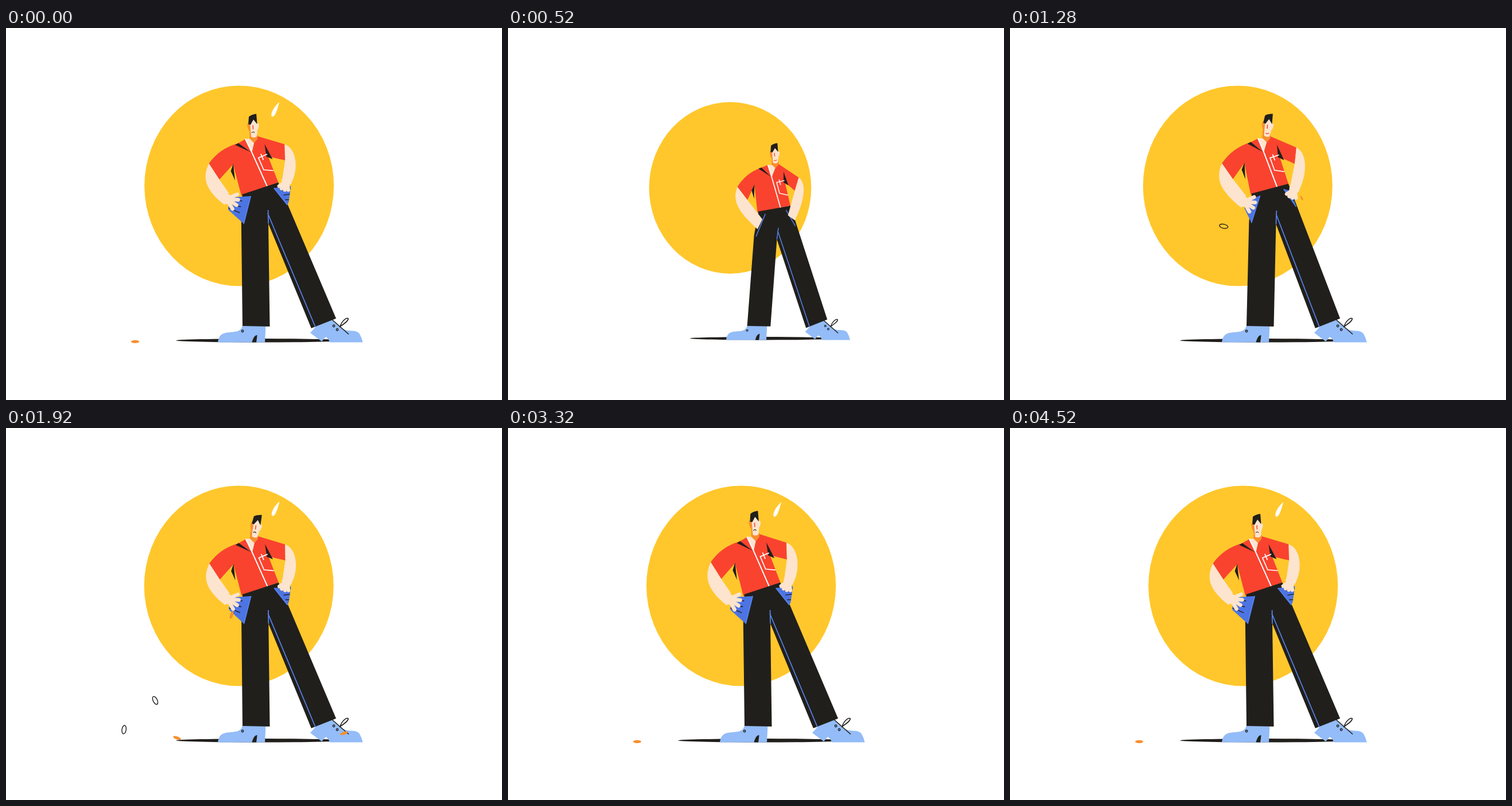
Recreate the animation shown at these times as an HTML page with a canvas. Size 864 by 648 pixels, loop 4560 ms.

```html
<!DOCTYPE html>
<html lang="en">
<head>
<meta charset="utf-8">
<title>Empty pockets</title>
<style>
html, body { margin: 0; width: 100%; height: 100%; overflow: hidden; background: #fff; }
canvas { display: block; width: 864px; height: 648px; }
</style>
</head>
<body>
<canvas id="stage"></canvas>
<script>
const LOOP = 4560, GROUND = 546.3, GRAVITY = 2400;
const canvas = document.getElementById('stage');
const ratio = window.devicePixelRatio || 1;
canvas.width = 864 * ratio;
canvas.height = 648 * ratio;
const ctx = canvas.getContext('2d');

const INK = '#211f1c', RED = '#f9432f', SKIN = '#fde4cf', SUN = '#ffc72c';
const ORANGE = '#f78f2d', SKY = '#93bcf8', BLUE = '#4d74e3', SEAM = '#5585ee';

const clamp = v => Math.min(1, Math.max(0, v));
const smooth = (t, a, b) => { const k = clamp((t - a) / (b - a)); return k * k * (3 - 2 * k); };
const rad = deg => deg * Math.PI / 180;
const add = (p, q, k = 1) => [p[0] + q[0] * k, p[1] + q[1] * k];
const lerp = (p, q, k) => [p[0] + (q[0] - p[0]) * k, p[1] + (q[1] - p[1]) * k];

function turn([x, y], [ox, oy], deg) {
  const c = Math.cos(rad(deg)), s = Math.sin(rad(deg));
  return [ox + (x - ox) * c - (y - oy) * s, oy + (x - ox) * s + (y - oy) * c];
}

function fill(color, d) {
  ctx.fillStyle = color;
  ctx.fill(new Path2D(d));
}
function line(color, width, d) {
  ctx.strokeStyle = color;
  ctx.lineWidth = width;
  ctx.stroke(new Path2D(d));
}
function oval(x, y, rx, ry, angle = 0) {
  ctx.beginPath();
  ctx.ellipse(x, y, rx, ry, angle, 0, 2 * Math.PI);
}
function dot(color, x, y, rx, ry = rx, angle = 0) {
  oval(x, y, rx, ry, angle);
  ctx.fillStyle = color;
  ctx.fill();
}
function ring(x, y, rx, ry = rx, angle = 0) {
  oval(x, y, rx, ry, angle);
  ctx.strokeStyle = INK;
  ctx.lineWidth = 1.4;
  ctx.stroke();
}

// The upper body is drawn upright, then tipped around the hips.
const HIP = [467.5, 280.3];
let lean = 0;   // 0: hands in pockets, 1: pockets turned out
let tip = 0;    // degrees
let shift = [0, 0];

const onHip = (x, y) => add(turn([x, y], HIP, tip), shift);

function inBody(stretch, paint) {
  ctx.save();
  ctx.translate(...add(HIP, shift));
  ctx.rotate(rad(tip));
  ctx.scale(1, stretch);
  ctx.translate(-HIP[0], -HIP[1]);
  paint();
  ctx.restore();
}

const arms = [
  {
    shoulder: [440, 200], swing: 13, outer: [392, 236], inner: [412.5, 262.5],
    elbow: [[383, 260], [387, 281]], wrist: [438, 312], pull: [-31, -22], half: [-5, 10],
    fan: 60, fanStep: -28, finger: 20,
    seam: [[449, 291], [430, 337]], cloth: [[411, 288], [407, 309]]
  },
  {
    shoulder: [478, 192], swing: -9.6, outer: [517, 217], inner: [509, 244],
    elbow: [[534.5, 230], [527.5, 266]], wrist: [502, 299], pull: [13, -25], half: [7, 5],
    fan: 80, fanStep: 22, finger: 16,
    seam: [[491, 283], [510, 315.5]], cloth: [[521, 284], [513, 311]]
  }
];
const swung = (arm, p) => turn(p, arm.shoulder, arm.swing * lean);

function drawShoes() {
  dot(INK, 444, 544.3, 148, 3.2);
  fill(SKY, 'M412 518H452.5L451 547.5H369C371 538 373 532 386 530.5C400 529 409 530 412 518Z');
  fill(INK, 'M428.5 547.5C430 541 433 535 437.5 535Q437 541 436 547.5Z');
  fill(SKY, 'M530 531L541 519L568 508L582 521Q590 528 604 527.5Q613 528 616 533Q620 540 621.5 547.5H564Q562 541 557 538L550 546Z');
  ring(412, 528, 1.7);
  ring(571, 519, 1.7);
  ring(577, 525.5, 1.7);
  line(INK, 1.6, 'M568 508L597 533.5M582 520C585 510 593 504 596 506C597 510 589 515 582 520Z');
}

function drawPants() {
  const crotch = onHip(472.5, 343);
  fill(INK, `M${onHip(435, 286)}L${onHip(500, 274.5)}L575 506L531.8 523L${crotch}L459.5 520L412 519L${onHip(426, 335)}Z`);
  line(SEAM, 1.7, `M${crotch}L${onHip(475.5, 319.5)}M${onHip(474, 325)}L539 521`);
}

function drawShirt() {
  const [l, r] = arms;
  const left = p => swung(l, p), right = p => swung(r, p);
  fill(RED, `M455 191L440 197Q${left([409, 208])} ${left(l.outer)}L${left(l.inner)}L426.7 232L433 288
    L500 274.5L489 227L${right(r.inner)}L${right(r.outer)}L476 189.5L471 191L462 216Z`);
  fill(SKIN, 'M455 191L462 216L471 193Z');
  fill(INK, 'M435 199L441 196.5L460 215Z M427 231L421 243L426 260Z M486 205V227L496 233Z');
  line('#fff', 2, 'M454 191L462 216L480 279');
  line('#fff', 1.7, 'M488 223L472 227L478 249L495 253M477 221L480 232');
}

// Cloth unfolds from the pocket seam, with three pleats.
function drawPocket({ seam: [a, b], cloth }) {
  const [c, d] = cloth.map(p => lerp(lerp(a, b, .5), p, lean));
  fill(BLUE, `M${a}L${b}L${d}L${c}Z`);
  for (let k = .15; k < 1; k += .35) {
    const from = lerp(c, d, k);
    line(INK, 1.4, `M${from}L${lerp(from, lerp(a, b, .1 + .7 * k), .65)}`);
  }
  line(SEAM, 1.7, `M${a}L${b}`);
}

function drawArm(arm) {
  const wrist = add(arm.wrist, arm.pull, lean);
  const [c, d] = arm.elbow.map(p => swung(arm, p));
  fill(SKIN, `M${swung(arm, arm.outer)}C${c} ${d} ${add(wrist, arm.half)}L${add(wrist, arm.half, -1)}L${swung(arm, arm.inner)}Z`);

  const size = clamp(lean / .45);
  if (size < .05) return;
  dot(SKIN, ...wrist, 9 * size);
  ctx.lineCap = 'round';
  for (let i = 0; i < 4; i++) {
    const end = turn(add(wrist, [arm.finger * size, 0]), wrist, arm.fan + arm.fanStep * i - tip);
    line(SKIN, 6.5 * size, `M${wrist}L${end}`);
  }
  ctx.lineCap = 'butt';
}

function drawHead(t) {
  const tilt = 14 * smooth(t, 1060, 1420) * (1 - smooth(t, 1800, 2500));
  ctx.save();
  ctx.translate(468.5, 188 + 2.5 * lean);
  ctx.rotate(rad(-tip));
  fill(ORANGE, 'M-6 -14L-4 -3L8 -4L7 3L1 10L-7 2Z');
  ctx.rotate(rad(tilt));
  fill(ORANGE, 'M-11 -24L-5 -24L-3 0L-6 0L-7 -11Q-10 -13 -11 -24Z');
  fill(SKIN, 'M-6 -25L0 -32L7 -25L9.5 -23Q9.5 -15 7 -13L6 -2Q2 2 -4 -1Z');
  fill(INK, 'M-9 -23L-8 -36Q-3 -40 5 -41L6.5 -23L0 -31L-5 -22Z');
  line(RED, 1.6, 'M-1 -21L-.5 -14');
  if (t < 1500) line(RED, 1.4, 'M-2 -6Q1 -4 4 -7');
  else line(INK, 1.2, 'M-3 -8Q0 -11 2 -8');
  ctx.restore();
}

function drawSweat(t) {
  const rise = 2.5 * (1 - Math.cos(2 * Math.PI * (t - 3320) / 1200));
  const size = smooth(t, 1480, 1720);
  ctx.save();
  ctx.translate(476 + rise * .4, 129 - rise);
  ctx.scale(size, size);
  fill('#fff', 'M0 0C-10 9 -16 21 -13 25C-9 28 -4 17 0 0Z');
  ctx.restore();
}

const coins = [
  { start: 1130, reach: -199, span: 1600, hop: .6, hollow: true },
  { start: 1300, reach: -228, span: 934, hop: .32, hollow: true },
  { start: 1400, reach: -183, span: 1412, hop: .17, stays: true },
  { start: 1840, reach: -60, span: 600, hop: .25 },
  { start: 1400, reach: 120, span: 900, hop: .28 },
  { start: 1250, reach: 165, span: 550, hop: .4 }
];

// Free fall followed by ever lower hops.
function height(age, drop, hop) {
  const fall = Math.sqrt(2 * drop / GRAVITY);
  if (age < fall) return drop - GRAVITY * age * age / 2;
  let speed = GRAVITY * fall, rest = age - fall;
  for (let i = 0; i < 4; i++) {
    speed *= hop;
    const air = 2 * speed / GRAVITY;
    if (rest < air) return speed * rest - GRAVITY * rest * rest / 2;
    rest -= air;
  }
  return 0;
}

function drawCoin(coin, t) {
  const age = t - coin.start;
  const size = clamp(age / 50) * (coin.stays ? 1 : clamp((coin.span - age) / 120));
  if (!size) return;
  const side = Math.sign(coin.reach);
  const [x0, y0] = side < 0 ? [408, 318] : [490, 295];
  const travel = 1 - Math.pow(1 - clamp(age / coin.span), 2);
  const x = x0 + coin.reach * travel;
  const y = GROUND - height(age / 1000, GROUND - y0, coin.hop);
  const spin = -side * .2 * Math.max(0, (coin.hollow ? 1110 : 620) - age);
  if (coin.hollow) ring(x, y, 7.5 * size, 3.6 * size, rad(spin));
  else dot(ORANGE, x, y, 7 * size, 2.6 * size, rad(spin));
}

function draw(time) {
  const t = time < 40 ? LOOP : time;   // the loop opens on the closing pose
  const s = 1 - Math.pow(1 - clamp(t / 1095), 3);
  const breath = t < 2120 ? 0 : (1 - Math.cos(2 * Math.PI * (t - 2120) / 2400)) / 2;
  lean = t < 960 ? 0 : 1 - Math.exp(-Math.pow((t - 960) / 349, 1.35));
  tip = -8.3 * lean;
  shift = [-24.5 * lean, -.8 * lean];

  ctx.setTransform(ratio, 0, 0, ratio, 0, 0);
  ctx.fillStyle = '#fff';
  ctx.fillRect(0, 0, 864, 648);
  dot(SUN, 383.1 + 23 * lean + 27 * (1 - s), 275 + 24 * (1 - s), 165 * s, 174.6 * s);
  drawSweat(t);

  ctx.save();
  ctx.translate(444, 519);
  ctx.scale(s, s);
  ctx.translate(-444, -519);
  const stretch = 1 + .04 * breath;
  drawShoes();
  inBody(stretch, drawShirt);
  drawPants();
  inBody(1, () => arms.forEach(drawPocket));
  inBody(stretch, () => {
    arms.forEach(drawArm);
    drawHead(t);
  });
  ctx.restore();

  coins.forEach(coin => drawCoin(coin, t));
}

const begin = performance.now();
function tick() {
  draw((performance.now() - begin) % LOOP);
  requestAnimationFrame(tick);
}
tick();
</script>
</body>
</html>
```
